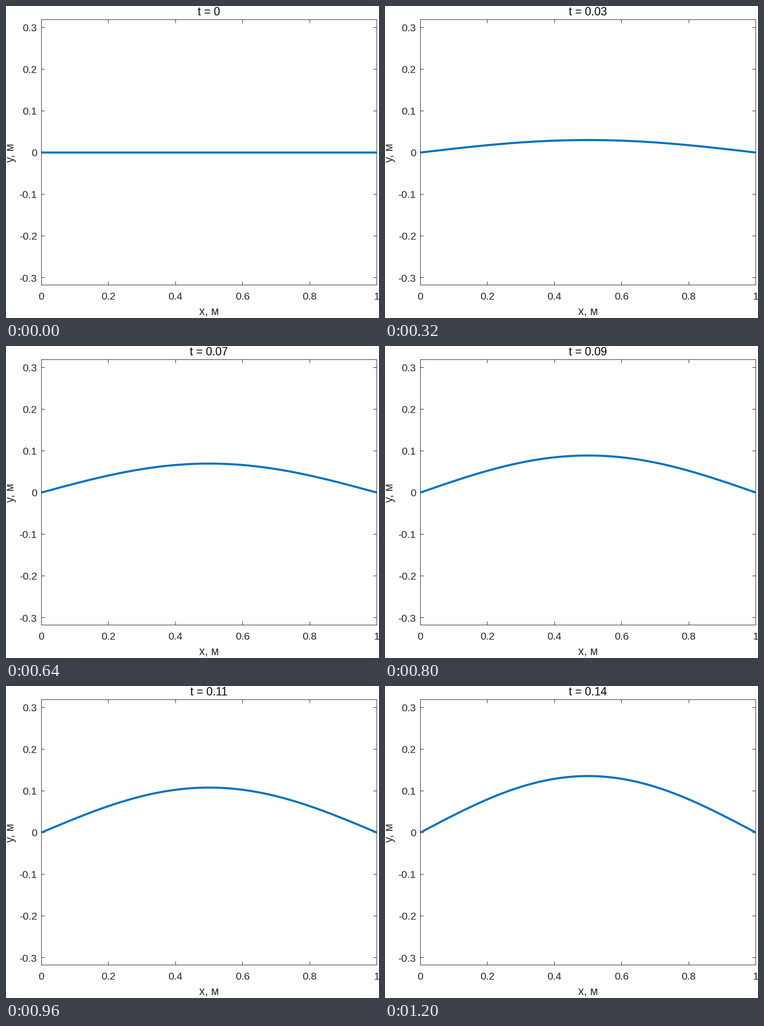
A matplotlib script that plays this animation: 753x629 px, repeating every 1.28 s.

```python
import numpy as np
import matplotlib.pyplot as plt
from matplotlib.animation import FuncAnimation
from matplotlib.transforms import Affine2D

W, H, DPI = 753, 629, 100
LEFT, RIGHT, TOP, BOTTOM = 71, 748, 27.4, 562.4
GRAY, BLUE = "#262626", "#0072bd"
PX = 72 / DPI  # points per pixel
AMP = 1 / np.pi

plt.rcParams["font.family"] = "Liberation Sans"
fig = plt.figure(figsize=(W / DPI, H / DPI), dpi=DPI, facecolor="white")
ax = fig.add_axes([LEFT / W, 1 - BOTTOM / H,
                   (RIGHT - LEFT) / W, (BOTTOM - TOP) / H])
ax.set(xlim=(0, 1), ylim=(-AMP, AMP))


def label(x, y, s, size=22.9, color=GRAY, ha="center", rot=0):
    """Text with its baseline at pixel (x, y), measured from the top left."""
    return fig.text(x / W, 1 - y / H, s, fontsize=size * PX, color=color,
                    ha=ha, va="baseline", rotation=rot,
                    rotation_mode="anchor")


xticks = np.linspace(0, 1, 6)
yticks = np.linspace(-0.3, 0.3, 7).round(1) + 0.0
ax.set_xticks(xticks)
ax.set_yticks(yticks)
ax.tick_params(direction="in", top=True, right=True, length=6.8 * PX,
               width=PX, color=GRAY, labelbottom=False, labelleft=False)
for spine in ax.spines.values():
    spine.set(linewidth=PX, edgecolor=GRAY)

for v in xticks:
    label(LEFT + v * (RIGHT - LEFT), 592, f"{v:g}", 20.83)
mid, scale = (TOP + BOTTOM) / 2, (BOTTOM - TOP) / (2 * AMP)
for v in yticks:
    label(62.5, mid - v * scale + 8.5, f"{v:g}", 20.83, ha="right")

label(410, 623, "x, м")
label(16, 295.5, "y, м", rot=90)
title = label(409.5, 19, "t = 0", color="black")

# The box snaps to whole pixels, so the free curve is moved to pixel centres.
half = ax.transData + Affine2D().translate(0.5, -0.5)
x = np.linspace(0, 1, 201)
string, = ax.plot(x, 0 * x, color=BLUE, lw=4.17 * PX, clip_on=False,
                  solid_capstyle="butt", snap=False, transform=half)


def update(i):
    t = max(i - 1, 0) / 100  # rest for one extra step at the start
    string.set_ydata(AMP * np.sin(np.pi * t) * np.sin(np.pi * x))
    title.set_text(f"t = {t:g}")
    return string, title


anim = FuncAnimation(fig, update, frames=16, interval=80, repeat=True,
                     repeat_delay=0, blit=False)
plt.show()
```
